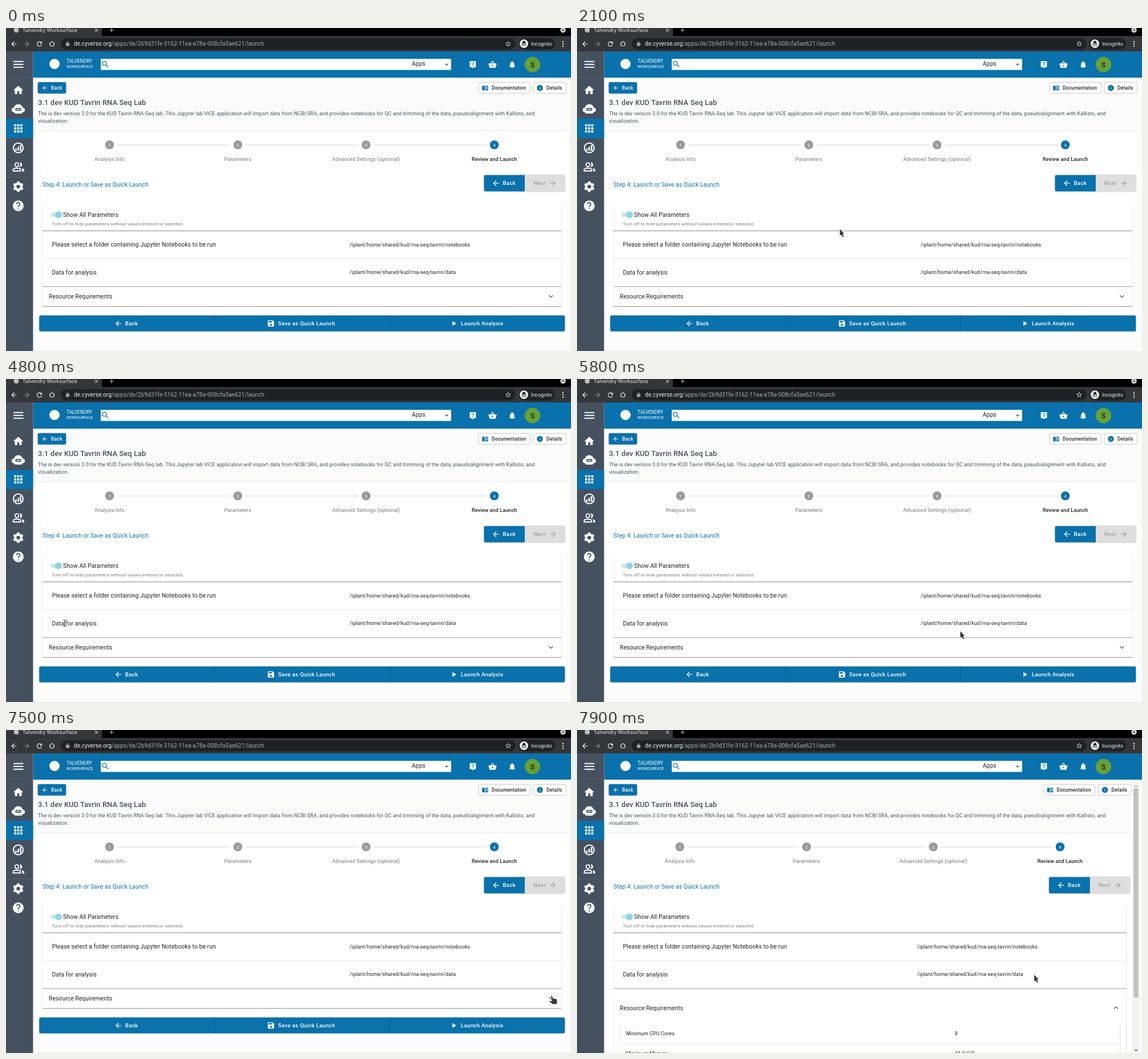
These frames come from a looping animation (990 px wide and 566 px high, 8 s). An HTML page:

```html
<!DOCTYPE html>
<html lang="en">
<head>
<meta charset="utf-8">
<title>Review and Launch</title>
<style>
html, body { margin: 0; width: 100%; height: 100%; overflow: hidden; background: #fbfbfb; }
svg { display: block; position: absolute; left: 0; top: 0; }
text { font-family: Roboto, Arial, sans-serif; white-space: pre; }
.soft { filter: drop-shadow(0 .4px .5px rgba(0,0,0,.16)); }
.btn { filter: drop-shadow(0 .8px .8px rgba(0,0,0,.35)); }
</style>
</head>
<body>
<svg width="990" height="566" viewBox="0 0 990 566">
  <g id="page"></g>
  <g id="frame"></g>
  <g id="cursor"></g>
</svg>
<script>
const BLUE = '#0971ab', SLATE = '#465160', INK = '#212121', GREY = '#757575';
const TOOLBAR = '#35363a', PILL = '#202124';
const LOOP = 8000, STEP = 100;

// size, weight, letter spacing in em
const FONT = {
  h6: [12.89, 500, .0075], body1: [10.31, 400, .0094], body2: [9.02, 400, .0107],
  strong: [9.02, 500, .0107], caption: [7.73, 400, .0333], small: [8.38, 500, .0286],
  large: [9.67, 500, .0286], num: [7.7, 400, 0], tab: [9.43, 400, 0], url: [10.19, 400, 0],
  chip: [8.9, 400, 0], logoA: [8.3, 400, 0], logoB: [6.6, 400, 0], avatar: [12.5, 500, 0]
};

const QUESTION = 'm1 17h-2v-2h2v2zm2.07-7.75l-.9.92C13.45 12.9 13 13.5 13 15h-2v-.5c0-1.1.45-2.1 1.17-2.83l1.24-1.26c.37-.36.59-.86.59-1.41 0-1.1-.9-2-2-2s-2 .9-2 2H8c0-2.21 1.79-4 4-4s4 1.79 4 4c0 .88-.36 1.68-.93 2.25z';
const DISC = 'M12 2C6.48 2 2 6.48 2 12s4.48 10 10 10 10-4.48 10-10S17.52 2 12 2z';
const ICON = {
  back: 'M20 11H7.83l5.59-5.59L12 4l-8 8 8 8 1.41-1.41L7.83 13H20v-2z',
  next: 'M12 4l-1.41 1.41L16.17 11H4v2h12.17l-5.58 5.59L12 20l8-8z',
  home: 'M10 20v-6h4v6h5v-8h3L12 3 2 12h3v8z',
  house: 'M12 3L2 12h3v8h14v-8h3zM7 18v-7.8l5-4.5 5 4.5V18z',
  help: DISC + QUESTION,
  live: 'M19 2H5c-1.1 0-2 .9-2 2v14c0 1.1.9 2 2 2h4l3 3 3-3h4c1.1 0 2-.9 2-2V4c0-1.1-.9-2-2-2zM12 1' + QUESTION,
  info: DISC + 'm1 15h-2v-6h2v6zm0-8h-2V7h2v2z',
  basket: 'M17.21 9l-4.38-6.56c-.4-.56-1.27-.56-1.66 0L6.79 9H2c-.55 0-1 .45-1 1l2.58 9.54c.23.84 1 1.46 1.92 1.46h13c.92 0 1.69-.62 1.93-1.46L23 10c0-.55-.45-1-1-1h-4.79zM9 9l3-4.4L15 9H9zm3 8c-1.1 0-2-.9-2-2s.9-2 2-2 2 .9 2 2-.9 2-2 2z',
  bell: 'M12 22c1.1 0 2-.9 2-2h-4c0 1.1.89 2 2 2zm6-6v-5c0-3.07-1.64-5.64-4.5-6.32V4c0-.83-.67-1.5-1.5-1.5s-1.5.67-1.5 1.5v.68C7.63 5.36 6 7.92 6 11v5l-2 2v1h16v-1l-2-2z',
  search: 'M15.5 14h-.79l-.28-.27C15.41 12.59 16 11.11 16 9.5 16 5.91 13.09 3 9.5 3S3 5.91 3 9.5 5.91 16 9.5 16c1.61 0 3.09-.59 4.23-1.57l.27.28v.79l5 4.99L20.49 19l-4.99-5zm-6 0C7.01 14 5 11.99 5 9.5S7.01 5 9.5 5 14 7.01 14 9.5 11.99 14 9.5 14z',
  save: 'M17 3H5c-1.11 0-2 .9-2 2v14c0 1.1.89 2 2 2h14c1.1 0 2-.9 2-2V7l-4-4zm-5 16c-1.66 0-3-1.34-3-3s1.34-3 3-3 3 1.34 3 3-1.34 3-3 3zm3-10H5V5h10v4z',
  play: 'M8 5v14l11-7z',
  chevron: 'M16.59 8.59L12 13.17 7.41 8.59 6 10l6 6 6-6z',
  drop: 'M7 10l5 5 5-5z',
  reload: 'M17.65 6.35C16.2 4.9 14.21 4 12 4c-4.42 0-8 3.58-8 8s3.58 8 8 8c3.73 0 6.84-2.55 7.73-6h-2.08c-.82 2.33-3.04 4-5.65 4-3.31 0-6-2.69-6-6s2.69-6 6-6c1.66 0 3.14.69 4.22 1.78L13 11h7V4z',
  lock: 'M18 8h-1V6c0-2.76-2.24-5-5-5S7 3.24 7 6v2H6c-1.1 0-2 .9-2 2v10c0 1.1.9 2 2 2h12c1.1 0 2-.9 2-2V10c0-1.1-.9-2-2-2zM9 6c0-1.66 1.34-3 3-3s3 1.34 3 3v2H9z',
  star: 'M22 9.24l-7.19-.62L12 2 9.19 8.63 2 9.24l5.46 4.73L5.82 21 12 17.27 18.18 21l-1.63-7.03zM12 15.4l-3.76 2.27 1-4.28-3.32-2.88 4.38-.38L12 6.1l1.71 4.04 4.38.38-3.32 2.88 1 4.28z',
  close: 'M19 6.4L17.6 5 12 10.6 6.4 5 5 6.4 10.6 12 5 17.6 6.4 19 12 13.4 17.6 19 19 17.6 13.4 12z',
  plus: 'M19 13h-6v6h-2v-6H5v-2h6V5h2v6h6z',
  book: 'M2 5h9v15H2zM13 5h9v15h-9zM14.5 8v1.5h6V8zM14.5 11.2v1.5h6v-1.5zM14.5 14.4v1.5h6v-1.5z'
};

const text = (x, y, s, font, fill = INK, anchor = 'start') => {
  const [size, weight, gap] = FONT[font];
  return `<text x="${x}" y="${y + size * .36}" font-size="${size}" font-weight="${weight}" letter-spacing="${gap * size}" fill="${fill}" text-anchor="${anchor}">${s}</text>`;
};
const rect = (x, y, w, h, fill, extra = '') =>
  `<rect x="${x}" y="${y}" width="${w}" height="${h}" fill="${fill}" ${extra}/>`;
const circle = (x, y, r, fill, extra = '') =>
  `<circle cx="${x}" cy="${y}" r="${r}" fill="${fill}" ${extra}/>`;
const icon = (name, x, y, size, fill, turn = 0) =>
  `<path d="${ICON[name]}" fill="${fill}" fill-rule="evenodd" transform="translate(${x} ${y}) rotate(${turn}) scale(${size / 24}) translate(-12 -12)"/>`;
const line = (x1, x2, y, color) => rect(x1, y - .35, x2 - x1, .7, color);
const card = (x, y, w, h) =>
  rect(x - .8, y, w + 1.6, h + 1.6, '#000', 'opacity=".09" rx="2"') +
  rect(x, y + 1, w, h + .2, '#000', 'opacity=".3" rx="1.5"') +
  rect(x, y, w, h, '#fff', 'rx="1.5"');

function browser() {
  let s = rect(0, 0, 990, 14, '#000') + rect(0, 0, 168, 14, TOOLBAR) + rect(0, 14, 990, 27, TOOLBAR);
  s += circle(18, 3.5, 4.5, '#b9bcc1');
  s += text(29, 4, 'Talvendry Worksurface', 'tab', '#e0e1e3');
  s += icon('close', 158.5, 4, 9.5, '#f1f1f1') + icon('plus', 185, 4, 12, '#c9cacc');
  s += circle(976, 3.5, 4.8, '#c8c9cb') + icon('drop', 976, 3.5, 10, '#111');
  s += icon('back', 14, 28, 14, '#f1f1f1') + icon('next', 36, 28, 14, '#85878a');
  s += icon('reload', 58.5, 28, 13.5, '#f1f1f1') + icon('house', 80.5, 27.5, 13, '#f1f1f1');
  s += rect(96, 18, 797, 19.5, PILL, 'rx="9.7"');
  s += icon('lock', 108, 27.5, 9.5, '#9aa0a6');
  s += text(119, 27.5, 'de.cyverse.org<tspan fill="#a3a8ad">/apps/de/2b9d31fe-3162-11ea-a78a-008cfa5ae621/launch</tspan>', 'url', '#eceded');
  s += icon('star', 880, 27.5, 12, '#d5d6d8');
  s += rect(898, 18, 64, 19.5, PILL, 'rx="9.7"') + circle(907.5, 27.5, 7.5, '#f1f1f1');
  s += '<path d="M903 27h9M905 26.5l1-3.5h3l1 3.5z" fill="#222" stroke="#222" stroke-width=".8"/>';
  s += [905.4, 909.6].map(x => circle(x, 30, 1.4, 'none', 'stroke="#222" stroke-width=".8"')).join('');
  s += text(920, 27.5, 'Incognito', 'chip', '#f1f1f1');
  return s + [-4, 0, 4].map(d => circle(976, 27.7 + d, 1.2, '#f1f1f1')).join('');
}

function appBar() {
  let s = rect(47.4, 41, 943, 46, BLUE);
  s += circle(85, 63, 9, '#fff');
  s += text(106, 58.2, 'TALVENDRY', 'logoA', '#fff') + text(106, 67.5, 'WORKSURFACE', 'logoB', '#fff');
  s += rect(166, 54, 614, 19.5, '#fff') + icon('search', 174, 63.5, 15.5, BLUE);
  s += text(711, 62.3, 'Apps', 'body1') + icon('drop', 772, 64, 15.5, '#666');
  s += icon('live', 818, 64, 14.5, '#fff') + icon('basket', 852.5, 64, 15.5, '#fff') + icon('bell', 887, 64, 15, '#fff');
  return s + circle(922.5, 64, 13.6, '#689f38') + text(922.5, 64, 'S', 'avatar', '#16240f', 'middle');
}

function sideBar() {
  const x = 21.5, stroke = 'fill="none" stroke="#fff" stroke-width="1.8"';
  let s = rect(0, 41, 47.4, 525, SLATE) + rect(0, 159, 47.4, 34, BLUE);
  s += line(0, 47.4, 87, '#5b6573') + line(0, 47.4, 261, '#5b6573');
  for (let i = -1; i < 2; i++) s += rect(13, 62.8 + i * 5, 17.5, 1.9, '#fff');
  s += icon('home', x, 109, 20.6, '#fff');
  s += circle(x, 141.5, 8, '#fff') + circle(14, 143.5, 4, '#fff') + circle(29, 143.5, 4, '#fff') + rect(14, 141, 15, 9, '#fff', 'rx="3"');
  s += rect(16.3, 140, 10.5, 5, SLATE, 'rx="2"') + rect(18, 141.8, 7, 1.4, '#fff');
  for (let i = 0; i < 9; i++) s += rect(14.2 + i % 3 * 5.4, 168.6 + (i / 3 | 0) * 5.4, 3.8, 3.8, '#fff');
  s += circle(x, 210, 8.5, 'none', 'stroke="#fff" stroke-width="2.1"');
  s += [4, 7, 10].map((h, i) => rect(16.3 + i * 4, 215 - h, 2.4, h, '#fff')).join('');
  s += `<circle cx="19" cy="239.5" r="3.3" ${stroke}/><path d="M12.5 250.5v-2c0-4 13-4 13 0v2z" ${stroke}/>`;
  s += '<path d="M24 235.3a4.2 4.2 0 0 1 0 8.4c1.6-2.6 1.6-5.8 0-8.4zM27 245.6c3 .8 5 2 5 3.8v2h-3.6v-2c0-1.6-.5-2.8-1.4-3.8z" fill="#fff"/>';
  s += circle(x, 278, 5.3, 'none', 'stroke="#fff" stroke-width="4.2"');
  s += circle(x, 278, 7.8, 'none', 'stroke="#fff" stroke-width="3" pathLength="60" stroke-dasharray="5 5" stroke-dashoffset="-2.5"');
  return s + icon('help', x, 311.5, 22.5, '#fff');
}

const GROWTH = 143, TOP = 93, VIEW = 473;

// p: how far the resource section is open
function page(p) {
  const grow = GROWTH * p, scroll = 537 + grow > 566;
  const R = scroll ? 973.5 : 984, right = R - 11, dx = R - 984;
  let s = rect(47, 87, 943, 479, '#fbfbfb');
  s += rect(53, 180, R - 53, 357 + grow, '#fff', 'class="soft"');

  s += rect(55.7, 95, 49.5, 19.8, BLUE, 'rx="2.5" class="btn"') + icon('back', 68, 105, 11.5, '#fff') + text(79, 104.8, 'Back', 'small', '#fff');
  const outline = 'rx="2.5" stroke="#bdbdbd" stroke-width=".8"';
  s += rect(828 + dx, 95.3, 90, 19, '#fff', outline) + icon('book', 839.5 + dx, 105, 12.5, BLUE) + text(851 + dx, 104.8, 'Documentation', 'small');
  s += rect(924 + dx, 95.3, 57.5, 19, '#fff', outline) + icon('info', 935.5 + dx, 105, 12.5, BLUE) + text(947 + dx, 104.8, 'Details', 'small');
  s += text(56, 130.8, '3.1 dev KUD Tavrin RNA Seq Lab', 'h6', SLATE);
  s += text(56, 150, 'The is dev version 3.0 for the KUD Tavrin RNA-Seq lab. This Jupyter lab VICE application will import data from NCBI SRA, and provides notebooks for QC and trimming of the data, pseudoalignment with Kallisto, and', 'body2', SLATE);
  s += text(56, 162.4, 'visualization.', 'body2', SLATE);
  s += line(53, R, 180, '#dcdcdc');

  const gap = (R - 85.1) / 4;
  ['Analysis Info', 'Parameters', 'Advanced Settings (optional)', 'Review and Launch'].forEach((label, i) => {
    const x = 69.1 + gap * (i + .5), on = i === 3;
    if (!on) s += line(x + 13.7, x + gap - 13.7, 205, '#bdbdbd');
    s += circle(x, 204.8, 7.75, on ? BLUE : '#9a9a9a') + text(x, 204.8, i + 1, 'num', '#fff', 'middle');
    s += text(x, 229.8, label, on ? 'strong' : 'body2', on ? INK : GREY, 'middle');
  });

  s += text(64, 274.7, 'Step 4: Launch or Save as Quick Launch', 'body1', BLUE);
  s += rect(837.6 + dx, 257.8, 141.6, 28.4, '#dedede', 'rx="2.5" class="btn"');
  s += rect(837.6 + dx, 257.8, 71.4, 28.4, BLUE, 'rx="2.5"') + rect(900 + dx, 257.8, 9, 28.4, BLUE);
  s += icon('back', 858.5 + dx, 272, 15, '#fff') + text(870.5 + dx, 272, 'Back', 'large', '#fff');
  s += text(924 + dx, 272, 'Next', 'large', '#a2a2a2') + icon('next', 958 + dx, 272, 15, '#a2a2a2');

  const top = 453.3 + 9.5 * p, mid = 470.2 + 16.6 * p, bottom = 487.2 + (GROWTH - 9.5) * p;
  s += card(64, top, right - 64, bottom - top);
  s += text(75, mid, 'Resource Requirements', 'body1') + icon('chevron', 955 + dx, mid, 15.5, '#555', 180 * p);
  if (p > 0) {
    const y = mid + 28, w = right - 86;
    s += `<clipPath id="open"><rect x="64" y="${mid + 17}" width="${right - 64}" height="${Math.max(0, bottom - mid - 17)}"/></clipPath><g clip-path="url(#open)">`;
    s += card(75, y, w, 104);
    [['Minimum CPU Cores', '8'], ['Minimum Memory', '16.0 GiB'], ['Minimum Disk Space', '64.0 GiB']].forEach(([name, value], i) => {
      const ry = y + 17.3 + i * 34.6;
      s += text(86, ry, name, 'body2') + text(662, ry, value, 'body2') + line(75, 75 + w, ry + 17.3, '#dcdcdc');
    });
    s += '</g>';
  }

  s += card(64, 355, right - 64, 97.4) + card(64, 307, right - 64, 47.8);
  s += rect(78, 323.5, 19, 7.5, '#c6e8f1', 'rx="3.75"') + circle(92, 327.4, 5.8, '#8fd5e6', 'class="soft"');
  s += text(100, 327.2, 'Show All Parameters', 'body1') + text(80.5, 343, 'Turn off to hide parameters without values entered or selected.', 'caption', GREY);
  const col = 64 + (right - 64) * .5919;
  s += text(80.5, 379.6, 'Please select a folder containing Jupyter Notebooks to be run', 'body1');
  s += text(col, 379.4, '/iplant/home/shared/kud/rna-seq-tavrin/notebooks', 'body2');
  s += line(64, right, 403.7, '#dcdcdc');
  s += text(80.5, 428.4, 'Data for analysis', 'body1') + text(col, 428, '/iplant/home/shared/kud/rna-seq-tavrin/data', 'body2');

  const third = (R - 63.1) / 3, barX = 58.3, barY = 503.8 + grow;
  s += rect(barX, barY, third * 3, 27.8, BLUE, 'rx="2.5" class="btn"');
  [['back', 'Back', -15, -3], ['save', 'Save as Quick Launch', -54.5, -42], ['play', 'Launch Analysis', -41, -28.7]].forEach(([glyph, label, ix, tx], i) => {
    const c = barX + third * (i + .5);
    s += icon(glyph, c + ix, barY + 14, 14.5, '#fff') + text(c + tx, barY + 14, label, 'large', '#fff');
    if (i) s += rect(barX - .3 + third * i, barY, .7, 27.8, '#075685');
  });

  if (scroll) {
    const thumb = 454 * VIEW / (537 + grow - TOP);
    s += rect(974, TOP, 11, VIEW, '#f1f1f1') + rect(975.3, 102.5, 8.3, thumb, '#c1c1c1');
    s += '<path d="M976.8 99.5l2.7-3 2.7 3z" fill="#a3a3a3"/><path d="M976.8 560l2.7 3 2.7-3z" fill="#505050"/>';
  }
  return s;
}

// time, x, y of the pointer's hot spot
const TRACK = [
  [0, 989.3, 191], [400, 989.3, 191], [700, 950, 221], [1000, 879.5, 298], [1100, 858, 311], [1300, 837, 319],
  [1800, 837, 319], [1900, 887, 326], [2000, 700, 346], [2200, 220, 357], [2400, 45, 342], [3200, 45, 342],
  [3300, 684.5, 388], [3500, 694.5, 388], [4000, 694.5, 388], [4100, 377, 438], [4200, 377, 438],
  [4300, 288, 462], [4400, 288, 462], [4600, 150, 440], [4800, 103, 428], [4900, 100, 428], [5000, 140, 424],
  [5200, 480, 425], [5300, 588, 429], [5500, 634.5, 430], [5700, 634.5, 430], [5800, 671, 441],
  [6000, 696.5, 438], [6200, 696.5, 438], [6300, 697, 438.5], [6500, 697, 438.5], [6800, 850, 455],
  [7100, 982, 464], [7400, 956, 465.5], [7600, 956, 465.5], [7800, 885, 446], [7900, 800.5, 428]
];

function pointer(t) {
  const i = TRACK.findIndex(k => k[0] > t);
  if (i < 0) return TRACK[TRACK.length - 1].slice(1);
  const [t0, x0, y0] = TRACK[i - 1], [t1, x1, y1] = TRACK[i], f = (t - t0) / (t1 - t0);
  return [x0 + (x1 - x0) * f, y0 + (y1 - y0) * f];
}

const EDGE = 'fill="#35373b" stroke="#fff" stroke-width=".6" stroke-linejoin="round"';
const SHAPE = {
  arrow: `<path d="M.3 .3V13L3 10.9L5.3 15L7.8 13.7L5.7 9.8L8.8 9.3Z" ${EDGE}/>`,
  beam: ['#fff" stroke-width="2', '#35373b" stroke-width=".9'].map(c =>
    `<path d="M-2.8-6Q0-6 0-4.8V4.8Q0 6 2.8 6M2.8-6Q0-6 0-4.8V4.8Q0 6-2.8 6" fill="none" stroke="${c}"/>`).join(''),
  hand: `<path d="M-1.5 1Q-.2-.9 1 1L2.6 5.2L4.4 4.8L6.3 5.4L8.2 5.8Q9.8 6.6 9.8 9L9.6 14.8L2.3 15.3L-3.8 10.6Q-4.8 9.1-3 8.7L.3 9.5Z" ${EDGE}/>`
};

function shapeAt(x, y) {
  if (y > 453 && y < 488 && x > 64 && x < 973) return 'hand';
  if (y > 421 && y < 436 && (x > 80 && x < 160 || x > 601 && x < 788)) return 'beam';
  return 'arrow';
}

// cubic-bezier(.4, 0, .2, 1)
function ease(x) {
  if (x <= 0) return 0;
  if (x >= 1) return 1;
  let lo = 0, hi = 1, u = .5;
  for (let i = 0; i < 20; i++) {
    u = (lo + hi) / 2;
    if (1.2 * u * (1 - u) ** 2 + .6 * u * u * (1 - u) + u ** 3 < x) lo = u; else hi = u;
  }
  return 3 * u * u * (1 - u) + u ** 3;
}

const $ = id => document.getElementById(id);
$('frame').innerHTML = browser() + appBar() + sideBar();

let shown = -1, last = -1;
const start = performance.now();
function draw(now) {
  const t = Math.floor(Math.max(0, now - start) % LOOP / STEP) * STEP;
  if (t !== last) {
    last = t;
    const open = ease((t - 7550) / 300);
    if (open !== shown) $('page').innerHTML = page(shown = open);
    const [x, y] = pointer(t);
    $('cursor').setAttribute('transform', `translate(${x} ${y})`);
    $('cursor').innerHTML = SHAPE[shapeAt(x, y)];
  }
  requestAnimationFrame(draw);
}
draw(start);
</script>
</body>
</html>
```
